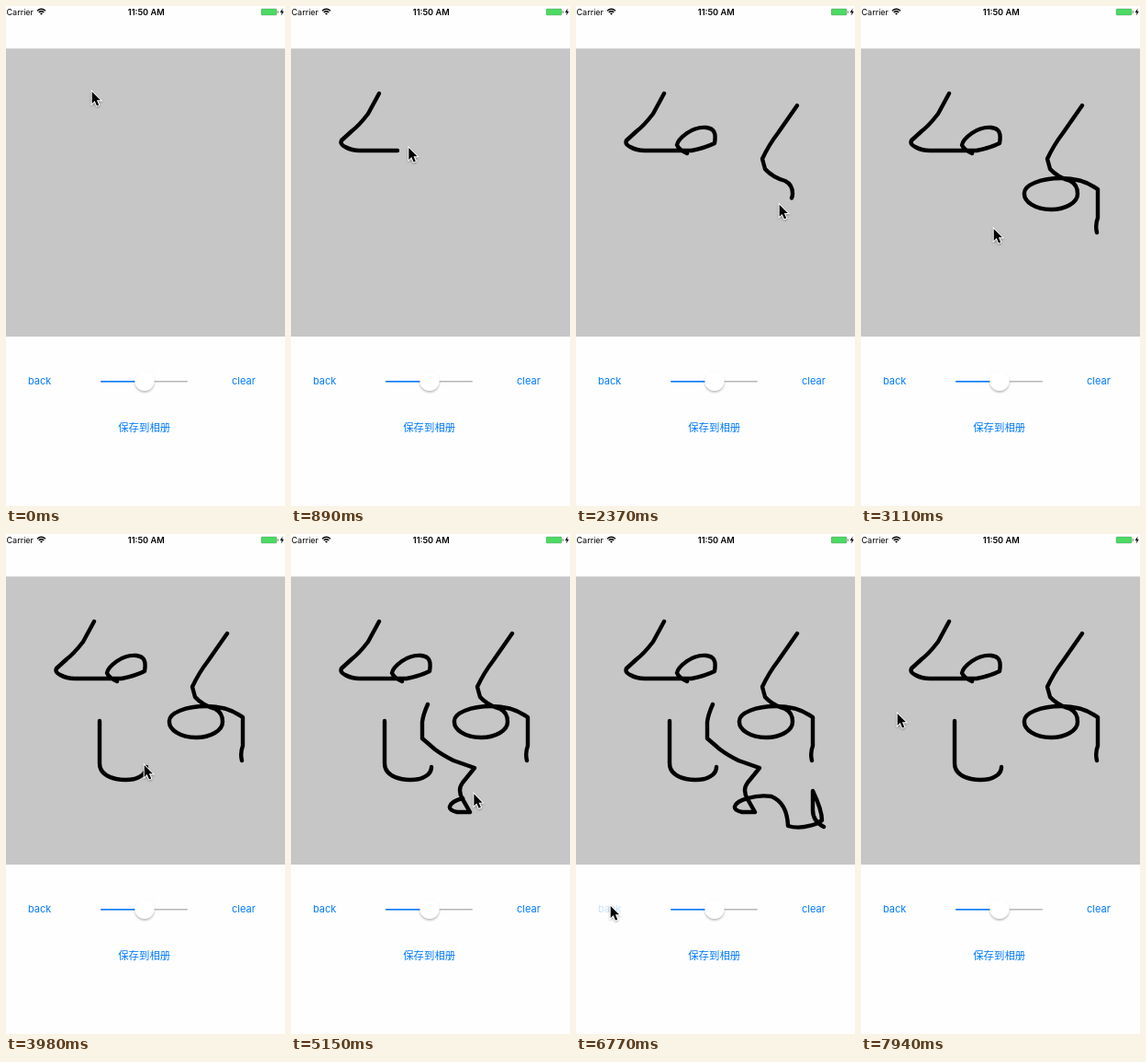
Animation, 304 px wide and 543 px high, one loop 8000 ms. Source, as an HTML page:

```html
<!DOCTYPE html>
<html lang="zh">
<head>
<meta charset="utf-8">
<style>
  html, body { margin: 0; width: 100%; height: 100%; overflow: hidden; background: #fefefe; }
  svg { display: block; width: 100%; height: 100%; }
  text { font: 11px Inter, "Noto Sans CJK SC", "Noto Sans CJK", sans-serif; }
  .btn { fill: #007aff; }
  #trail path { fill: none; stroke-width: 4.4; stroke-linecap: round; stroke-linejoin: round; }
  #trail .ink { stroke: #000; }
</style>
</head>
<body>
<svg viewBox="0 0 304 543">
  <defs>
    <filter id="soft" x="-50%" y="-50%" width="200%" height="200%">
      <feDropShadow dx="0" dy="1.6" stdDeviation="1.3" flood-opacity=".3"/>
    </filter>
    <filter id="drop" x="-50%" y="-50%" width="200%" height="200%">
      <feDropShadow dx="0" dy="1" stdDeviation=".8" flood-opacity=".4"/>
    </filter>
  </defs>

  <text x=".5" y="10" style="font-size:9px">Carrier</text>
  <g fill="none" stroke="#000" stroke-width="1.4">
    <path d="M34 5.2Q38.5 1.2 43 5.2M35.7 7.1Q38.5 4.6 41.3 7.1"/>
    <path d="M37 8L38.5 9.8L40 8Q38.5 7 37 8Z" fill="#000" stroke="none"/>
  </g>
  <text x="152.7" y="10" text-anchor="middle" style="font-size:9.2px;font-weight:600">11:50 AM</text>
  <rect x="278" y="3" width="17" height="7" rx="1.2" fill="#4cd964" stroke="#555" stroke-opacity=".4" stroke-width=".6"/>
  <rect x="295.7" y="5.2" width="1.1" height="2.6" rx=".5" fill="#777"/>
  <path d="M301.6 2.6L298.6 7H300.5L299.8 10.4L302.8 5.8H300.9Z"/>

  <rect y="46.2" width="304" height="312.8" fill="#c6c6c6"/>
  <g id="trail"></g>

  <text id="back" class="btn" x="24" y="411">back</text>
  <text class="btn" x="246" y="411">clear</text>
  <text class="btn" x="150.7" y="462.3" text-anchor="middle" style="font-size:11.4px">保存到相册</text>
  <rect x="103" y="407" width="95" height="1.6" rx=".8" fill="#b7b7b7"/>
  <rect x="103" y="407" width="48" height="1.6" rx=".8" fill="#007aff"/>
  <circle cx="151" cy="407.3" r="10.6" fill="#fff" filter="url(#soft)"/>

  <path id="cursor" d="M.7 .9V13.9L3.7 11.1L6 16.4L8.2 15.4L5.9 10.3H10Z"
    stroke="#fff" stroke-width="1.8" paint-order="stroke" filter="url(#drop)"/>
</svg>
<script>
const LOOP = 8000, STEP = 147;   // the screen refreshes once per step
const PRESS = 46, UNDO = 47;     // steps at which "back" is held and takes effect
const LAG = 15;                  // ink trails the moving pen by this length

// Pointer route: [step at its end, path from the last point, draws ink]
const route = [
  [10, "L84 117Q74 130 66 136L55 146Q53 150 59 153Q66 157 75 157H126Q141 154 151 149" +
       "C153 137 150 133 142 132Q131 131 121 138Q111 145 110 151Q112 156 121 160", true],
  [12, "L215 136"],
  [13, "L241 108"],
  [20, "L220 138Q210 151 203 166L206 177Q214 186 228 190Q236 194 236 204" +
       "A29 17 0 0 1 207 221A29 17 0 0 1 178 203A40 16 0 0 1 218 187Q242 187 258 199V230Q255 238 257 246", true],
  [21, "L147 244"],
  [23, "L102 203"],
  [27, "V249Q102 262 120 266Q130 268 140 266Q153 262 153 253", true],
  [28, "L153 253"],
  [29, "L149 185"],
  [39.6, "Q144 196 143 204V222L157 234Q165 240 177 246L200 254L187 270Q181 278 187 288L195 302H181" +
       "Q172 300 173 296Q175 290 187 287Q200 283 213 285Q230 292 231 317Q244 321 261 315" +
       "L268 311Q268 300 258 279V300Q258 312 270 318", true],
  [44, "Q180 372 60 409"],
  [45, "L40 406"],
  [47, "L40 406"],
  [52, "Q42 330 61 203"],
  [54, "L42 197"]
];

const $ = id => document.getElementById(id);

let start = 0, x = 96, y = 95;
const legs = route.map(([end, d, ink]) => {
  const path = document.createElementNS("http://www.w3.org/2000/svg", "path");
  path.setAttribute("d", `M${x} ${y}${d}`);
  if (ink) path.setAttribute("class", "ink");
  $("trail").append(path);
  const length = path.getTotalLength();
  ({ x, y } = path.getPointAtLength(length));
  const leg = { start, end, path, ink, length };
  start = end;
  return leg;
});
const undone = legs.findLast(leg => leg.ink);

function draw(step) {
  for (const leg of legs) {
    const u = Math.min(1, Math.max(0, (step - leg.start) / (leg.end - leg.start)));
    const done = u * leg.length;
    if (step >= leg.start) {
      const p = leg.path.getPointAtLength(done);
      $("cursor").setAttribute("transform", `translate(${p.x - 3} ${p.y - 3})`);
    }
    if (!leg.ink) continue;
    const shown = u < 1 ? done - LAG : done;
    const visible = shown > 0 && !(leg === undone && step >= UNDO);
    leg.path.style.visibility = visible ? "visible" : "hidden";
    leg.path.style.strokeDasharray = `${Math.max(0, shown)} 9999`;
  }
  $("back").setAttribute("opacity", step === PRESS ? .2 : 1);
}

const began = performance.now();
function frame() {
  draw(Math.floor((performance.now() - began) % LOOP / STEP));
  requestAnimationFrame(frame);
}
frame();
</script>
</body>
</html>
```
